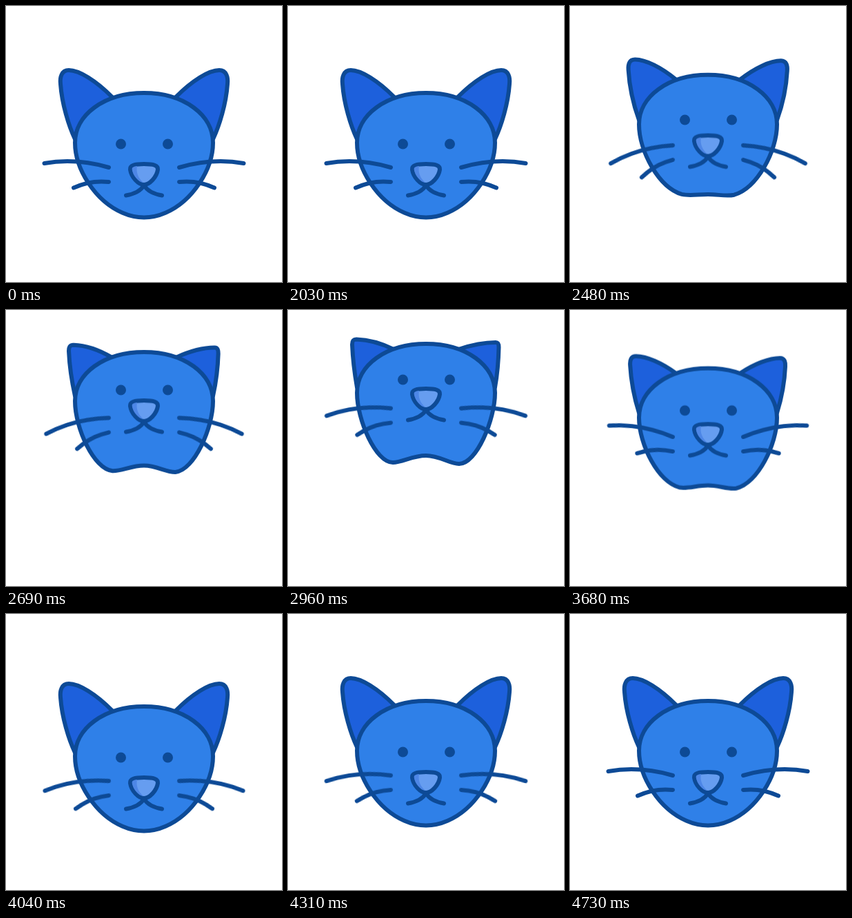
An HTML page for the animation above (5120 ms loop, 400 by 400 pixels).

```html
<!DOCTYPE html>
<html lang="en">
<head>
<meta charset="utf-8">
<title>Nodding cat</title>
<style>
  html, body { margin: 0; width: 100%; height: 100%; overflow: hidden; background: #fff; }
  svg { display: block; width: 100vw; height: 100vh; }

  .head, .ear, .face, .muzzle, .whiskers, .whisker {
    animation: 5120ms cubic-bezier(.333, 0, .667, 1) infinite;
  }
  .line { fill: none; }
  .head { animation-name: nod; }
  .ear { fill: #1d60dc; }
  .left { animation-name: left-ear; }
  .right { animation-name: right-ear; }
  .face { animation-name: face; fill: #2f80e8; }
  .muzzle { animation-name: muzzle; }
  .whiskers { animation-name: whiskers; }
  .whisker { animation-name: sway; fill: none; }
  .upper { transform-origin: 149px 234px; }
  .lower { transform-origin: 149px 255px; }
  .eye { fill: #0d4a96; stroke: none; }

  /* dip, rise, hold, drop past rest, settle */
  @keyframes nod {
    0%, 39.65%, 82.03%, 100% { transform: translateY(0); }
    43.07%, 78.87% { transform: translateY(8px); }
    55.47%, 66.31% { transform: translateY(-99px); }
  }

  /* the head tilts back while it is raised */
  @keyframes face {
    0%, 43.07%, 78.87%, 100% {
      d: path("M200 126C142 126 100 158 100 198C100 236.4 129.4 282.8 168.9 299.8C178.7 304.1 189.2 306.5 200 306.5C210.8 306.5 221.3 304.1 231.1 299.8C270.6 282.8 300 236.4 300 198C300 158 258 126 200 126Z");
    }
    55.47%, 66.31% {
      d: path("M200 148C142 148 100 179 100 219C100 258 127 320 152 320C166 320 180 310 200 310C220 310 234 322 248 322C273 322 300 258 300 219C300 179 258 148 200 148Z");
    }
  }
  @keyframes left-ear {
    0%, 43.07%, 78.87%, 100% {
      d: path("M154 132C130 108 106 93 91 93C80 93 78 104 79 113C81 142 91 174 100 193L130 190Z");
    }
    55.47%, 66.31% {
      d: path("M153 156C135 147 115 142 99 141.5C94 141.5 93 144 93 149C94 174 97 194 100 211L130 205Z");
    }
  }
  @keyframes right-ear {
    0%, 43.07%, 78.87%, 100% {
      d: path("M154 132C130 108 106 93 91 93C80 93 78 104 79 113C81 142 91 174 100 193L130 190Z");
    }
    55.47%, 66.31% {
      d: path("M153 156C135 150 115 146 99 146C95 146 94.5 149 94.5 153C95 176 97 194 100 211L130 205Z");
    }
  }
  @keyframes muzzle {
    0%, 43.07%, 78.87%, 100% { transform: translateY(0); }
    55.47%, 66.31% { transform: translateY(-16px); }
  }
  @keyframes whiskers {
    0%, 43.07%, 78.87%, 100% { transform: translateY(0); }
    55.47%, 66.31% { transform: translateY(7.5px); }
  }

  /* whiskers trail behind the head */
  @keyframes sway {
    0%, 39.65%, 92.58%, 100% { transform: rotate(0deg); }
    48.83% { transform: rotate(-20deg); }
    71.09% { transform: rotate(7deg); }
    79.3% { transform: rotate(-12.5deg); }
  }
</style>
</head>
<body>
<svg viewBox="0 0 400 400" stroke="#0d4a96" stroke-width="6" stroke-linecap="round" stroke-linejoin="round">
  <g class="head">
    <path class="ear left" d="M154 132C130 108 106 93 91 93C80 93 78 104 79 113C81 142 91 174 100 193L130 190Z"/>
    <g transform="translate(400) scale(-1 1)">
      <path class="ear right" d="M154 132C130 108 106 93 91 93C80 93 78 104 79 113C81 142 91 174 100 193L130 190Z"/>
    </g>
    <path class="face" d="M200 126C142 126 100 158 100 198C100 236.4 129.4 282.8 168.9 299.8C178.7 304.1 189.2 306.5 200 306.5C210.8 306.5 221.3 304.1 231.1 299.8C270.6 282.8 300 236.4 300 198C300 158 258 126 200 126Z"/>
    <circle class="eye" cx="166.5" cy="200" r="7.5"/>
    <circle class="eye" cx="234.5" cy="200" r="7.5"/>
    <g class="muzzle">
      <path fill="#669df0" d="M200 229C214 229 220.5 231 220 237C218.5 248 208 259 200 259C192 259 181.5 248 180 237C179.5 231 186 229 200 229Z"/>
      <path fill="#4d86e6" stroke="none" d="M190 232C188 241 192 250 199 256C192 255 184 246 182.7 237C182.5 233.5 185 232.5 190 232Z"/>
      <path class="line" d="M174 274.500C186 272.500 195 268 200 260C205 268 214 272.500 226 274.500"/>
    </g>
    <g class="whiskers">
      <path class="whisker upper" d="M55.500 228C87 222.500 118 225 149 234"/>
      <path class="whisker lower" d="M98 263.500C113 256.500 131 253 149 255"/>
    </g>
    <g transform="translate(400) scale(-1 1)">
      <g class="whiskers">
        <path class="whisker upper" d="M55.500 228C87 222.500 118 225 149 234"/>
        <path class="whisker lower" d="M98 263.500C113 256.500 131 253 149 255"/>
      </g>
    </g>
  </g>
</svg>
</body>
</html>
```
